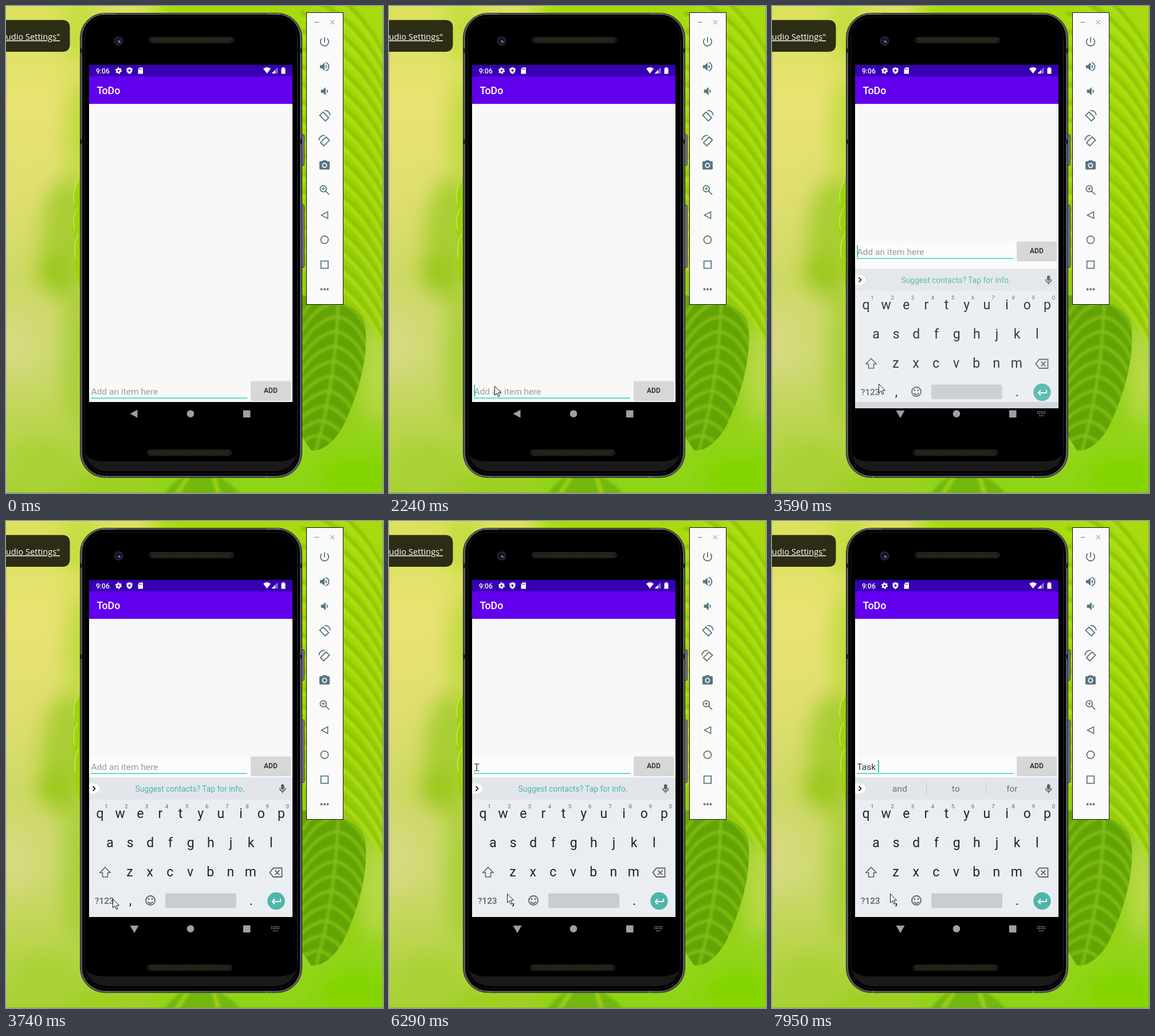
These frames come from a looping animation (658x851 px, 8 s). An HTML page:

```html
<!DOCTYPE html>
<html lang="en">
<head>
<meta charset="utf-8">
<title>ToDo</title>
<style>
html, body { margin: 0; width: 100%; height: 100%; overflow: hidden; }
svg { display: block; }
text { font-family: Roboto, sans-serif; white-space: pre; }
.mid { text-anchor: middle; }
.line { fill: none; stroke-width: 1.8; }
.key { font-size: 23px; fill: #14282f; text-anchor: middle; }
.digit { font-size: 9.5px; fill: #59656b; text-anchor: middle; }
.field { font-size: 15.55px; }
</style>
</head>
<body>
<svg width="658" height="851" viewBox="0 0 658 851">
  <defs>
    <linearGradient id="sky" x2="0" y2="1">
      <stop offset="0" stop-color="#dae15c"/><stop offset=".2" stop-color="#e8e373"/>
      <stop offset=".38" stop-color="#e0df70"/><stop offset=".55" stop-color="#cfd966"/>
      <stop offset=".72" stop-color="#d0d974"/><stop offset=".86" stop-color="#bdd550"/>
      <stop offset="1" stop-color="#a6d132"/>
    </linearGradient>
    <linearGradient id="lime" x2="0" y2="1">
      <stop offset="0" stop-color="#a9dc0a"/><stop offset=".3" stop-color="#a2d704"/>
      <stop offset=".6" stop-color="#93cb08"/><stop offset=".85" stop-color="#94d41c"/>
      <stop offset="1" stop-color="#84d506"/>
    </linearGradient>
    <filter id="soft" x="-60%" y="-60%" width="220%" height="220%"><feGaussianBlur stdDeviation="18"/></filter>
    <filter id="haze"><feGaussianBlur stdDeviation="2"/></filter>
    <clipPath id="leafClip"><path d="M515 505C570 512 620 520 627 560C634 620 610 690 588 735C570 768 545 780 532 776L515 750Z"/></clipPath>
    <clipPath id="screenClip"><path d="M145 412H500V703H145Z"/></clipPath>
  </defs>

  <!-- blurred foliage -->
  <rect width="658" height="851" fill="url(#sky)"/>
  <g filter="url(#soft)">
    <rect x="260" y="-60" width="500" height="980" fill="url(#lime)"/>
    <ellipse cx="130" cy="40" rx="30" ry="60" fill="#c3dd3c"/>
    <ellipse cx="130" cy="220" rx="26" ry="100" fill="#bfd93c"/>
    <ellipse cx="108" cy="410" rx="46" ry="110" fill="#a9cd30"/>
    <ellipse cx="82" cy="465" rx="26" ry="34" fill="#98c612"/>
    <ellipse cx="128" cy="620" rx="30" ry="130" fill="#a9cf38"/>
    <ellipse cx="15" cy="590" rx="24" ry="60" fill="#d8d982"/>
    <ellipse cx="70" cy="800" rx="60" ry="40" fill="#a9d236"/>
    <ellipse cx="190" cy="838" rx="90" ry="16" fill="#98d016"/>
    <ellipse cx="648" cy="640" rx="24" ry="90" fill="#bcdb4a"/>
    <ellipse cx="610" cy="815" rx="70" ry="40" fill="#84d506"/>
  </g>
  <path d="M131 298Q114 318 117 345Q121 358 116 372Q114 395 122 405Q115 430 123 470L131 500Z" fill="#9fd20e"/>
  <path d="M128 304Q115 322 119 345M125 352Q114 372 120 392M127 398Q117 416 121 440" fill="none" stroke="#c9e860" stroke-width="1.500"/>
  <g filter="url(#haze)">
    <path d="M275 856Q300 815 345 815Q390 825 410 856Z" fill="#72b80c"/>
    <path d="M296 856L318 822M372 856L362 822" stroke="#96d018" stroke-width="8"/>
  </g>
  <g id="ribs" fill="none" filter="url(#haze)"></g>
  <g clip-path="url(#leafClip)">
    <path d="M510 495H640V785H510Z" fill="#62a306"/>
    <g id="veins" fill="none" filter="url(#haze)"></g>
  </g>
  <path d="M0.500 80V851" stroke="#bcb6ae"/>
  <path d="M0 850.500H658M657.500 0V851" stroke="#7d9a55" stroke-opacity=".7"/>

  <path d="M0 24.500H98Q111.500 24.500 111.500 38V66.500Q111.500 80 98 80H0Z" fill="#2d2d15"/>
  <text x="94" y="59" text-anchor="end" font-size="14.600" fill="#fff" text-decoration="underline" style="font-family:'Open Sans',sans-serif">udio Settings"</text>

  <!-- phone -->
  <g fill="#77778a" stroke="#33333b">
    <rect x="514.500" y="224.500" width="6" height="54" rx="2"/>
    <rect x="514.500" y="347.500" width="6" height="110" rx="2"/>
  </g>
  <rect x="129.500" y="12.500" width="387" height="811.500" rx="43" fill="#5c5d62" stroke="#1d1d20"/>
  <rect x="133" y="15" width="380" height="806" rx="40" fill="#000"/>
  <path d="M137 770Q139 812 178 813H468Q507 812 509 770V778Q505 796 470 796H176Q141 796 137 778Z" fill="#191919"/>
  <rect x="137.500" y="19.500" width="371" height="797" rx="35" fill="none" stroke="#1b1b1d"/>
  <path d="M509 60V770" stroke="#29292c"/>
  <path d="M130 78H134M512 78H516M130 237H134M512 237H516" stroke="#222" stroke-width="8"/>
  <path d="M168 14H191M455 14H478M176 821V825M455 821V825" stroke="#77777c" stroke-width="2"/>
  <circle cx="196.500" cy="61" r="8" fill="#24262b"/><circle cx="196.500" cy="61" r="5" fill="#0c0e18"/>
  <circle cx="197" cy="61.500" r="2.500" fill="#3a4aa0"/><circle cx="198.500" cy="63" r="1" fill="#c9d2ff"/>
  <g id="speakers"></g>

  <!-- app -->
  <path d="M145 103H500V692H145Z" fill="#f8f8f8"/>
  <path d="M145 103H500V123H145Z" fill="#3700b3"/>
  <path d="M145 123H500V171H145Z" fill="#6200ee"/>
  <g fill="#fff">
    <text x="157" y="117.500" font-size="12.100" font-weight="500">9:06</text>
    <text x="158.500" y="154" font-size="17.800" font-weight="500">ToDo</text>
    <circle cx="196.500" cy="113" r="3.100" fill="none" stroke="#fff" stroke-width="2.600"/>
    <circle cx="196.500" cy="113" r="4.800" fill="none" stroke="#fff" stroke-width="1.800" stroke-dasharray="2.500 2.527"/>
    <path d="M215.500 107L220.500 109V112.500Q220 117 215.500 119Q211 117 210.500 112.500V109Z"/>
    <circle cx="215.500" cy="112.800" r="2" fill="#3700b3"/>
    <path d="M233 107.500H239V118.500H230.500V110Z"/>
    <path d="M232.500 109.500V111.500M234.500 109.500V111.500M236.500 109.500V111.500" stroke="#3700b3"/>
    <path d="M449 109.500Q455.500 104.500 462 109.500L455.500 118Z"/>
    <path d="M474.500 107V118H463.500Z" opacity=".4"/><path d="M469.500 112V118H463.500Z"/>
    <path d="M480.500 108.500H482.500V107H485.500V108.500H487.500V118.500H480.500Z"/>
  </g>
  <path id="lift" d="M145 412H500V692H145Z" fill="#fbfbfb"/>
  <g id="entry">
    <rect x="427.500" y="656.500" width="69.500" height="33.500" rx="2" fill="#bbb" opacity=".6"/>
    <rect x="427" y="655.500" width="70" height="33" rx="2" fill="#d6d7d7"/>
    <text x="462" y="676" class="mid" font-size="12.100" font-weight="500" fill="#222">ADD</text>
    <path d="M148 685.200H421" stroke="#2fd6c3" stroke-width="1.600"/>
    <text id="hint" class="field" x="148.400" y="678.500" fill="#9b9b9b">Add an item here</text>
    <text id="typed" class="field" x="148.400" y="678.500" fill="#333"></text>
    <path id="compose" stroke="#333"/>
    <path id="caret" stroke="#14bfae" stroke-width="1.800"/>
  </g>
  <g fill="#a0a0a0">
    <path id="back"/>
    <circle cx="322" cy="712.500" r="6.300"/>
    <path d="M414 706.500H426.500V719H414Z"/>
  </g>

  <!-- keyboard -->
  <g clip-path="url(#screenClip)"><g id="keyboard">
    <path d="M145 448H500V692H145Z" fill="#eaeef2"/>
    <path d="M145 448H500V486.500H145Z" fill="#e2e6ea"/>
    <path d="M145 458.500Q163 458 163 467.500Q163 477 145 476.500Z" fill="#fff"/>
    <path d="M151.500 463.500L155.500 467.500L151.500 471.500" class="line" stroke="#222"/>
    <text id="tip" x="321" y="473" class="mid" font-size="13.800" fill="#4db6ac">Suggest contacts? Tap for info.</text>
    <g id="words"></g>
    <rect x="480" y="460" width="5.500" height="9.500" rx="2.750" fill="#566268"/>
    <path d="M477.800 466.500Q478 472 482.700 472T487.600 466.500M482.700 472V475.500" class="line" stroke="#566268" stroke-width="1.500"/>
    <g id="keys"></g>
    <g class="line" stroke="#56646b">
      <path d="M173 605L182 614.500H177.500V622H168.500V614.500H164Z" stroke-width="1.600"/>
      <path d="M466.500 606.500H481.500V622H466.500L460.500 614.300ZM469.500 610.300L477.500 618.300M477.500 610.300L469.500 618.300"/>
      <circle cx="252" cy="663" r="8"/>
      <path d="M247.800 665Q249 668 252 668T256.200 665"/>
    </g>
    <g fill="#56646b"><circle cx="249" cy="660.500" r="1.400"/><circle cx="255" cy="660.500" r="1.400"/></g>
    <text x="155" y="668.500" font-size="15.300" font-weight="500" fill="#56646b">?123</text>
    <rect x="278" y="650.500" width="124" height="25.500" rx="3" fill="#c8cdd1"/>
    <circle cx="471.500" cy="664" r="15.200" fill="#4db6ac"/>
    <path d="M479 660V665H465M469 660.500L464.500 665L469 669.500" class="line" stroke="#fff"/>
  </g></g>
  <path id="imeIcon" d="M463 709H478M463 712H478M466 716H475" stroke="#a0a0a0" stroke-width="1.700" stroke-dasharray="1.800 1.200"/>

  <!-- emulator controls -->
  <rect x="524.500" y="11.500" width="64" height="510" fill="#fafafa" stroke="#111"/>
  <g id="tools" fill="#587482" stroke="#587482"></g>

  <path id="mouse" d="M0.500 0.500V16L4.200 12.700L6.700 18.500L9 17.500L6.500 11.800H11.500Z" fill="#fff" stroke="#111"/>
</svg>
<script>
const $ = id => document.getElementById(id);
const many = (n, make) => Array.from({length: n}, (_, i) => make(i)).join('');
const stroke = (d, color, width) => `<path d="${d}" stroke="${color}" stroke-width="${width}"/>`;

// Leaf texture: sweeping ribs above, feathered veins on the dark leaf below
$('ribs').innerHTML = many(17, i => {
  const rib = y => `M515 ${y}Q610 ${y + 30} 662 ${y + 140}`;
  const y = i * 31 - 50;
  return stroke(rib(y), '#8cc604', 7) + stroke(rib(y + 10), '#b2df1e', 5);
});
$('veins').innerHTML = stroke('M580 500Q578 650 540 780', '#8cc41a', 4) + many(11, i => {
  const y = 490 + i * 26, x = 580 - i * i * .35;
  return stroke(`M${x} ${y}Q${x + 35} ${y + 10} ${x + 52} ${y + 55}`, '#86bf12', 5) +
    stroke(`M${x} ${y}Q${x - 40} ${y + 8} ${x - 62} ${y + 50}`, '#86bf12', 5);
});

$('speakers').innerHTML = [[250, 55], [247, 776]].map(([x, y]) =>
  `<rect x="${x}" y="${y}" width="147" height="9" rx="4.500" fill="#15150f" stroke="#3c3b30"/>` +
  `<path d="M${x + 4} ${y + 3}h139M${x + 5} ${y + 6}h138" stroke="#514f3e" stroke-width="1.500" stroke-dasharray="1.500 1.500"/>`
).join('');

// Keyboard letters
const label = (cls, x, y, s) => `<text class="${cls}" x="${x}" y="${y}">${s}</text>`;
const row = (letters, x, y) => many(letters.length, i => label('key', x + i * 35.15, y, letters[i]));
$('keys').innerHTML = row('qwertyuiop', 164, 519) + row('asdfghjkl', 181.5, 570) +
  row('zxcvbnm', 216, 621) + label('key', 217, 671, ',') + label('key', 428, 671, '.') +
  many(10, i => label('digit', 175 + i * 35.15, 502, (i + 1) % 10));

// Side panel icons on a 24-unit grid
const icon = (y, body, s = .9) =>
  `<g transform="translate(556 ${y}) scale(${s}) translate(-12 -12)">${body}</g>`;
const solid = d => `<path d="${d}" stroke="none"/>`;
const outline = d => `<path d="${d}" fill="none" stroke-width="2"/>`;
const turn = outline('M9 4.500L20 15.500L13.500 22L2.500 11ZM11.500 1.500Q21.500 1 23 11');
$('tools').innerHTML =
  '<path d="M538.500 28.500H546.500M566 25L573 32M573 25L566 32" stroke="#777"/>' +
  icon(62.5, outline('M12 3V13M7 5.800A8 8 0 1 0 17 5.800')) +
  icon(106, solid('M3 9V15H7L12 20V4L7 9ZM14 8V16Q16.500 15 16.500 12T14 8') + outline('M14 4.200A8 8 0 0 1 14 19.800')) +
  icon(149, solid('M5 9V15H9L14 20V4L9 9ZM16 8V16Q18.500 15 18.500 12T16 8')) +
  icon(192, turn) +
  icon(235.5, `<g transform="translate(24 0) scale(-1 1)">${turn}</g>`) +
  icon(278.5, solid('M9 2L7.200 4H4Q2 4 2 6V18Q2 20 4 20H20Q22 20 22 18V6Q22 4 20 4H16.800L15 2Z') +
    '<circle cx="12" cy="12" r="4" stroke="#fafafa" stroke-width="2"/>') +
  icon(321.5, '<circle cx="9.500" cy="9.500" r="6" fill="none" stroke-width="2"/>' +
    outline('M14 14L21 21') + '<path d="M9.500 6.500V12.500M6.500 9.500H12.500" stroke-width="1.400"/>') +
  icon(365.5, outline('M18.500 5V19L5.500 12Z'), .85) +
  icon(408.5, '<circle cx="12" cy="12" r="7.300" fill="none" stroke-width="2"/>') +
  icon(452, outline('M5 5H19V19H5Z')) +
  icon(495, many(3, i => `<circle cx="${6 + 6 * i}" cy="12" r="2.200" stroke="none"/>`));

// Timeline: each entry holds from its time until the next one
const LOOP = 8000;
const LIFT = 3470, SLIDE = 3590, SETTLED = 3740;
const mouseAt = [[0, -50, -50], [140, 260, 737], [300, 185, 668], [450, 184, 664], [2520, 185, 662],
  [2640, 186, 660], [4140, 188, 660], [4260, 195, 660], [4410, 202, 654], [4530, 206, 651]];
const blinks = [300, 720, 1250, 1680, 2240, 2640, 3070, 3740, 4140, 4680, 5080, 5610,
  5730, 6290, 6570, 7130, 7280, 7800, 7950];
const typedAt = [[0, ''], [5730, 'T'], [6570, 'Ta'], [7280, 'Tas'], [7400, 'Task'], [7950, 'Task ']];
const wordsAt = [[0, ''], [7280, 'Tasks Tas Taste'], [7400, 'Tasks Task Tusk'], [7950, 'and to for']];
const current = (list, t) => list.filter(e => e[0] <= t).pop();
const show = (id, on) => $(id).style.display = on ? '' : 'none';

function draw(t) {
  const [, mx, my] = current(mouseAt, t);
  $('mouse').setAttribute('transform', `translate(${mx} ${my})`);

  show('lift', t >= LIFT);
  $('entry').setAttribute('transform', `translate(0 ${t >= LIFT ? -244 : 0})`);
  const open = t >= SLIDE, sliding = t < SETTLED;
  show('keyboard', open);
  show('imeIcon', open);
  $('keyboard').setAttribute('transform', `translate(0 ${sliding ? 11 : 0})`);
  $('keyboard').setAttribute('opacity', sliding ? .9 : 1);
  $('back').setAttribute('d', open ? 'M216.500 707H231.500L224 720Z' : 'M229.500 705.500V719.500L216.500 712.500Z');

  const text = current(typedAt, t)[1];
  $('typed').textContent = text;
  show('hint', !text);
  const end = 149.2 + (text && $('typed').getComputedTextLength());
  $('caret').setAttribute('d', `M${end} 662V683`);
  show('caret', blinks.filter(b => b <= t).length % 2);
  $('compose').setAttribute('d', `M148.500 680.500H${end - .8}`);
  show('compose', text && !text.endsWith(' '));

  const words = current(wordsAt, t)[1];
  show('tip', !words);
  $('words').innerHTML = words && '<path d="M269.500 457V478M373.500 457V478" stroke="#c0c7cb"/>' +
    words.split(' ').map((w, i) =>
      `<text class="field mid" x="${223 + 98 * i}" y="473" fill="#67737a">${w}</text>`).join('');
}

const start = performance.now();
function tick() {
  draw((performance.now() - start) % LOOP);
  requestAnimationFrame(tick);
}
tick();
</script>
</body>
</html>
```
